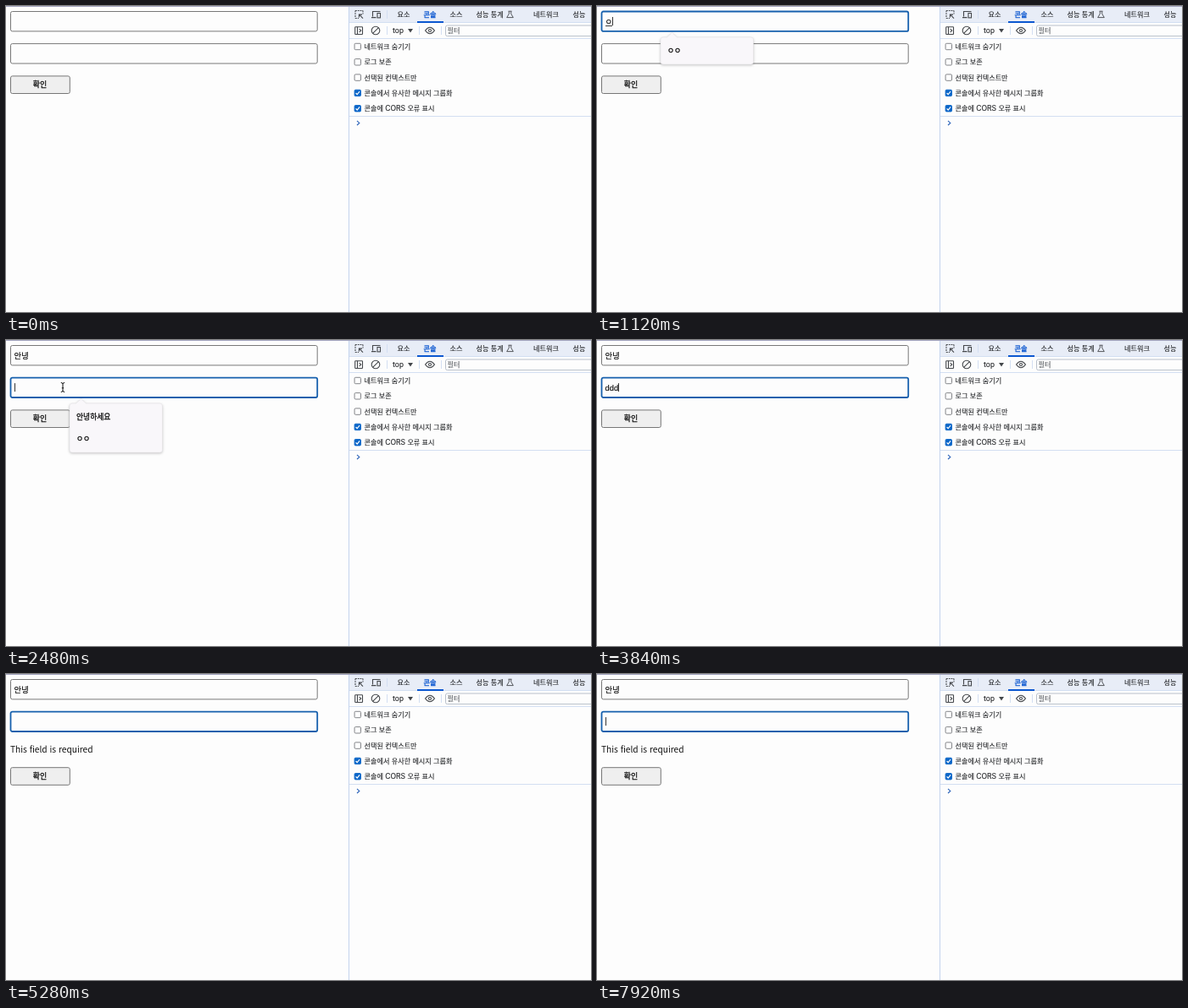
These frames come from a looping animation (690 px wide and 362 px high, 8 s). An HTML page:

```html
<!DOCTYPE html>
<html lang="ko">
<head>
<meta charset="utf-8">
<title>Form validation</title>
<style>
  html, body { margin: 0; width: 100%; height: 100%; overflow: hidden; background: #fdfdfd; }
  svg { display: block; }
  text { font-family: "Noto Sans CJK KR", "Noto Sans CJK JP", sans-serif; fill: #111; white-space: pre; }
  .strong { stroke: #111; stroke-width: .3; }
  .tools text { font-size: 8.15px; fill: #242629; stroke: #242629; stroke-width: .12; }
  .tools .on { fill: #0b57d0; stroke: #0b57d0; stroke-width: .3; }
  .tools .latin { font: 8.6px Inter, sans-serif; }
  .icon { fill: none; stroke: #44474b; stroke-width: 1.1; }
  .sep { stroke: #d3dff2; stroke-width: 1; }
  .field rect { fill: #fdfdfd; stroke: #787878; stroke-width: 1; }
  .field.focus rect { stroke: #1660ad; stroke-width: 1.8; }
  .field text { font: 9.3px "Liberation Sans", "Noto Sans CJK KR", sans-serif; fill: #000; stroke: #000; stroke-width: .1; }
  .field line { stroke: #000; stroke-width: .8; }
  #popup path { fill: #f9f7fa; stroke: #dfdde1; stroke-width: .5; filter: drop-shadow(0 1px 1.5px rgba(0, 0, 0, .22)); }
  #popup text { font-size: 8.8px; }
</style>
</head>
<body>
<svg width="690" height="362" viewBox="0 0 690 362">
  <rect width="690" height="362" fill="#fdfdfd"/>

  <g class="tools">
    <rect x="405" y="1" width="285" height="18.5" fill="#e8edf7"/>
    <path class="sep" d="M405 19.5H690M405 38.5H690M405 130.5H690M449.5 5v10M449.5 24v10M487.5 24v10M513.5 24v10"/>
    <path d="M404.5 0V362" stroke="#c4d4ee"/>
    <rect x="485" y="18" width="31" height="2" fill="#0b57d0"/>

    <g class="icon">
      <path d="M412 5.5h9" stroke-dasharray="1.8 1"/>
      <path d="M412 5.5v9M412 14.5h4M421 5.5v4" stroke-dasharray="1.8 1"/>
      <path d="M421 14.6l-4-4M416.4 13.5v-3.4h3.6"/>
      <path d="M432.5 12.5v-6h9M431 13.6h5.5"/>
      <rect x="438" y="8.5" width="3.5" height="5.4"/>
      <path d="M592.5 6.2h4M593.3 6.2v3l-2.6 4.4h7.6l-2.6-4.4v-3" stroke-width=".9"/>
      <rect x="411.7" y="24.7" width="8.8" height="8.8" rx=".6"/>
      <path d="M414.5 24.7v8.8M416.7 27.2l2 1.9-2 1.9"/>
      <circle cx="436" cy="29" r="4.8"/>
      <path d="M432.6 32.4l6.8-6.8"/>
      <path d="M494.5 29q5.5-7.6 11 0q-5.5 7.6-11 0z"/>
      <circle cx="500" cy="29" r="1.5"/>
    </g>
    <path d="M474 27h6l-3 4.6z" fill="#44474b"/>
    <rect x="518.5" y="23" width="190" height="12.6" rx="2" fill="#fdfdfd" stroke="#b9c0cb"/>

    <text x="461.6" y="13">요소</text>
    <text x="492.6" y="13" class="on">콘솔</text>
    <text x="523.6" y="13">소스</text>
    <text x="554.6" y="13">성능 통계</text>
    <text x="622" y="13">네트워크</text>
    <text x="668.6" y="13">성능</text>
    <text x="456" y="31.8" style="font:8.9px Roboto,sans-serif">top</text>
    <text x="520.6" y="32" style="fill:#666a70">필터</text>
    <g id="options"></g>
    <path d="M414 135.8l2.8 2.6-2.8 2.6" fill="none" stroke="#2a62b8" stroke-width="1.1"/>
  </g>

  <path d="M0 .5H690" stroke="#a2a3be"/>

  <g class="field">
    <rect x="5.5" y="6.5" width="361.7" height="23.4" rx="2"/>
    <text x="9.6" y="21.5"></text>
    <line class="under" y1="23.6" y2="23.6"/>
    <line class="caret" y1="13" y2="23"/>
  </g>
  <g class="field" transform="translate(0 38.1)">
    <rect x="5.5" y="6.5" width="361.7" height="23.4" rx="2"/>
    <text x="9.6" y="21.5"></text>
    <line class="under" y1="23.6" y2="23.6"/>
    <line class="caret" y1="13" y2="23"/>
  </g>
  <text id="error" x="5" y="92.6"></text>
  <g id="button">
    <rect x="5.5" y="82.9" width="69.8" height="20.6" rx="2" fill="#efefef" stroke="#767676"/>
    <text class="strong" x="31.8" y="95.8" font-size="8.9">확인</text>
  </g>

  <g id="popup">
    <path/>
    <text class="strong" x="83" y="55.7"></text>
    <text class="strong" x="83" y="81.7"></text>
  </g>

  <path id="arrow" d="M0 0v11l2.6-2.4 1.7 3.8 1.8-.8-1.7-3.7h3.6z" fill="#000" stroke="#fff" stroke-width=".8"/>
  <path id="beam" d="M-2.2-5.5q2.2 0 2.2 1.5v8q0 1.5-2.2 1.5M2.2-5.5q-2.2 0-2.2 1.5M0 4q0 1.5 2.2 1.5M-1.2.8h2.4" fill="none" stroke="#111"/>
</svg>
<script>
  const LOOP = 8000, TEXT_X = 9.6, ROW = 26;
  const $ = s => document.querySelector(s);
  const REQUIRED = 'This field is required';
  const INVALID = '입력 형식이 잘못되었습니다.';
  const HELLO = '안녕하세요', OO = 'ㅇㅇ';

  $('#options').innerHTML = [
    ['네트워크 숨기기', 0], ['로그 보존', 0], ['선택된 컨텍스트만', 0],
    ['콘솔에서 유사한 메시지 그룹화', 1], ['콘솔에 <tspan class="latin">CORS</tspan> 오류 표시', 1]
  ].map(([label, on], i) => {
    const y = 48 + i * 18.3;
    return `<rect x="411.1" y="${y - 3.7}" width="7.4" height="7.4" rx="1.2"
        fill="${on ? '#0b66c8' : '#fff'}" stroke="${on ? '#0b66c8' : '#74777b'}" stroke-width=".9"/>` +
      (on ? `<path d="M412.6 ${y + .1}l1.6 1.7 2.9-3.7" fill="none" stroke="#fff" stroke-width="1.2"/>` : '') +
      `<text x="422.5" y="${y + 3}">${label}</text>`;
  }).join('');

  // Each step lists only what changes; "ime" underlines the last syllable.
  const steps = [
    [0, { a: '', b: '', focus: -1, caret: 0, ime: 0, list: [], error: '', arrow: null, beam: null }],
    [240, { arrow: [292, 306] }],
    [320, { arrow: [171, 165] }],
    [480, { arrow: [140, 118] }],
    [560, { arrow: [106, 66] }],
    [640, { arrow: null, beam: [82, 26] }],
    [720, { beam: [67, 20] }],
    [800, { focus: 0, caret: 1 }],
    [1040, { a: 'ㅇ', ime: 1, list: [OO], beam: null }],
    [1520, { a: '아', list: [] }],
    [1680, { a: '안', list: [HELLO] }],
    [1840, { a: '안ㄴ', list: [] }],
    [2000, { a: '안녀', list: [HELLO] }],
    [2080, { beam: [67.5, 32] }],
    [2160, { a: '안녕', beam: [67, 45] }],
    [2240, { beam: [67, 56] }],
    [2320, { focus: 1, ime: 0, list: [] }],
    [2480, { list: [HELLO, OO] }],
    [2640, { caret: 0 }],
    [3120, { caret: 1 }],
    [3440, { b: 'd', list: [], beam: null }],
    [3600, { b: 'dd' }],
    [3840, { b: 'ddd' }],
    [4320, { caret: 0 }],
    [4560, { b: 'dd', caret: 1 }],
    [4640, { b: 'd' }],
    [4800, { b: '', error: REQUIRED }],
    [5280, { caret: 0 }],
    [5840, { b: 'ㅇ', ime: 1, caret: 1, list: [OO], error: INVALID }],
    [6000, { b: '아', list: [] }],
    [6480, { caret: 0 }],
    [6960, { b: '앙', caret: 1 }],
    [7040, { b: '아아' }],
    [7120, { b: '아앙' }],
    [7200, { b: '아아아' }],
    [7680, { b: '아아', ime: 0 }],
    [7760, { b: '아' }],
    [7920, { b: '', error: REQUIRED }]
  ];

  const show = (el, on) => el.setAttribute('visibility', on ? 'visible' : 'hidden');
  const move = (el, x, y) => el.setAttribute('transform', `translate(${x} ${y})`);
  const span = (el, x1, x2) => { el.setAttribute('x1', x1); el.setAttribute('x2', x2); };

  function drawField(el, value, focus, s) {
    const text = el.querySelector('text'), under = el.querySelector('.under'), caret = el.querySelector('.caret');
    text.textContent = value;
    el.classList.toggle('focus', focus);
    const end = TEXT_X + (value ? text.getComputedTextLength() : 0);
    const caretX = Math.round(end) + .5;
    const composing = focus && s.ime && value;
    show(under, composing);
    show(caret, focus && s.caret);
    span(caret, caretX, caretX);
    if (composing) {
      const head = value.length > 1 ? text.getSubStringLength(0, value.length - 1) : 0;
      span(under, TEXT_X + head + .4, end - .2);
    }
  }

  function drawPopup(s) {
    const n = s.list.length, el = $('#popup');
    show(el, n);
    if (!n) return;
    move(el, 0, s.focus * 38.1);
    el.querySelector('path').setAttribute('d',
      `M78 37h4.5l6-5.5 6 5.5h87q3 0 3 3v${n * ROW}q0 3-3 3h-103.5q-3 0-3-3v${-n * ROW}q0-3 3-3z`);
    el.querySelectorAll('text').forEach((t, i) => t.textContent = s.list[i] || '');
  }

  function drawMouse(id, pos) {
    const el = $(id);
    show(el, pos);
    if (pos) move(el, ...pos);
  }

  function draw(s) {
    document.querySelectorAll('.field').forEach((el, i) => drawField(el, i ? s.b : s.a, s.focus === i, s));
    const error = $('#error');
    error.textContent = s.error;
    error.setAttribute('font-size', s.error === REQUIRED ? 10.2 : 10.6);
    move($('#button'), 0, s.error ? 27.8 : 0);
    drawPopup(s);
    drawMouse('#arrow', s.arrow);
    drawMouse('#beam', s.beam);
  }

  const start = performance.now();
  let last = -1;
  function tick() {
    const t = (performance.now() - start) % LOOP;
    const past = steps.filter(([at]) => at <= t);
    if (past.length !== last) {
      last = past.length;
      draw(Object.assign({}, ...past.map(p => p[1])));
    }
    requestAnimationFrame(tick);
  }
  tick();
</script>
</body>
</html>
```
